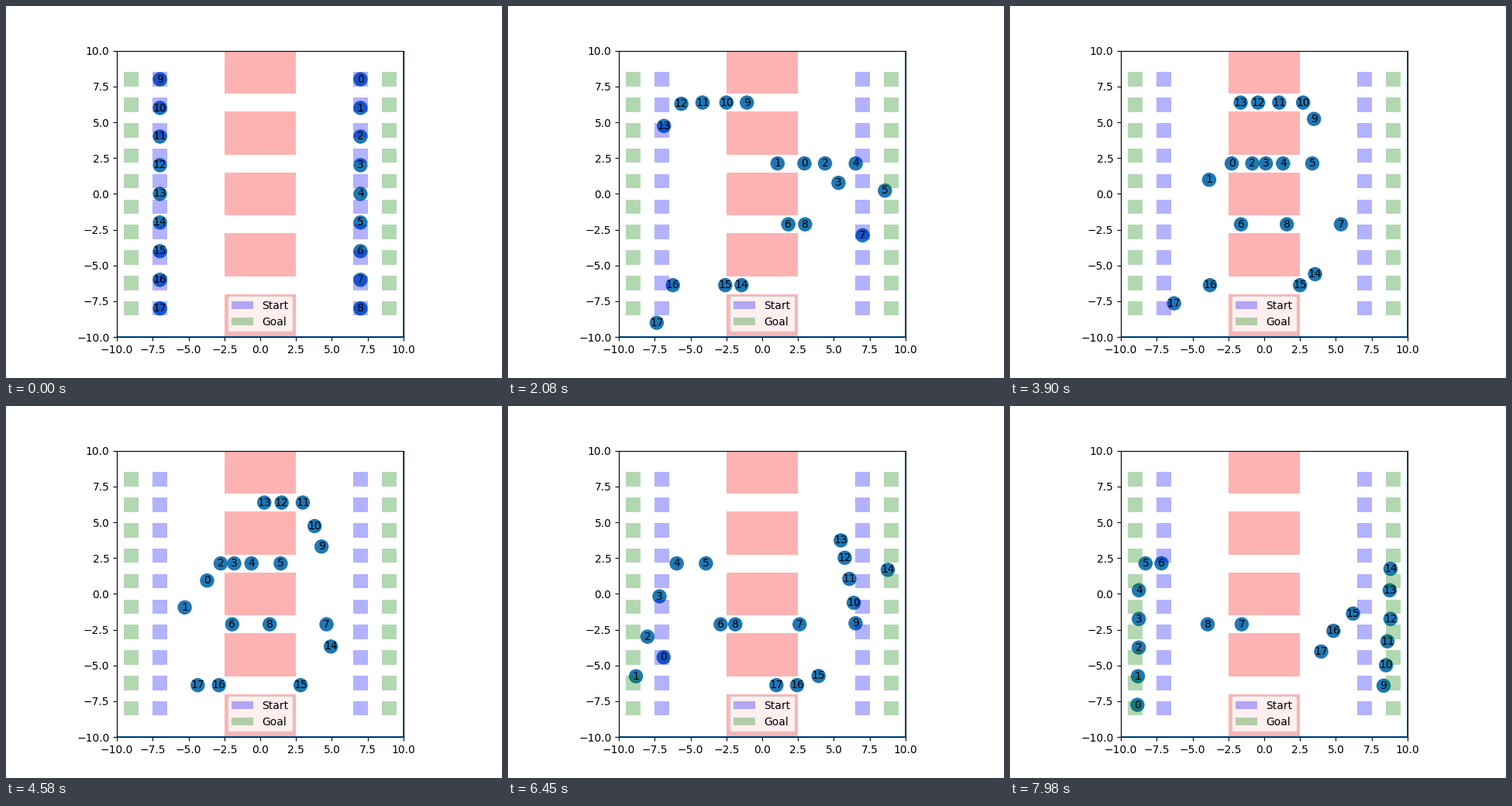
A matplotlib script that plays this animation: 640x480 px, repeating every 8 s.

```python
import numpy as np
import matplotlib.pyplot as plt
from matplotlib.animation import FuncAnimation
from matplotlib.patches import Circle, Rectangle

STEPS, STEP_MS = 320, 25
PACE = 14           # steps per unit, counted along the longer axis
GATE, GOAL = 3, 9   # |x| of the corridor mouths and of the goals
LANE = 2.125        # corridor centres lie at odd multiples of this
REACH = 0.25        # a robot halts this close to its goal

tracks = []


def robot(lane, *stops):
    """Pass timed stops (step, x[, y]), then run at full pace to the goal.

    Free running goes diagonally into the lane, straight through the
    corridor, and turns off towards the mirrored goal.
    """
    k = len(tracks)
    way = -1 if k < 9 else 1
    lane_y, y0 = lane * LANE, 8 - 2 * (k % 9)
    keys = [(0, -7 * way, y0)]
    for step, x, *y in stops:
        keys.append((step, x, y[0] if y else lane_y))

    t, x, y = keys[-1]
    enter = -way * max(GATE, abs(x) - abs(y - lane_y))
    leave = way * max(GATE, GOAL - abs(y0 + lane_y))
    route = [(enter, lane_y), (leave, lane_y), (GOAL * way, -y0)]
    for nx, ny in route:
        size = max(abs(nx - x), abs(ny - y))
        if way * nx > way * x and size > 0:
            t, x, y = t + PACE * size, nx, ny
            keys.append((t, x, y))

    t, x, y = np.array(keys, float).T
    q = np.minimum(np.arange(STEPS), t[-1] - PACE * REACH)
    tracks.append(np.column_stack([np.interp(q, t, x), np.interp(q, t, y)]))


# right side, heading left
robot(1)
robot(1)
robot(1, (52, 6.6))
robot(1, (68, 6.4, -0.3))
robot(1, (49, 8.96, 1.1))
robot(1, (77, 9, -0.2))
robot(-1, (47, 3.52), (156, -1.62), (258, -2.9))
robot(-1, (47, 7.67, -3.65), (120, 6.33), (262, 2.5))
robot(-1, (82, 3), (120, 2.8), (319, -3.95))

# left side, heading right
robot(3)
robot(3, (20, -7, 6))
robot(3, (47, -6.74))
robot(3, (51, -7.93, 4))
robot(3, (53, -9, 2.6))
robot(-3)
robot(-3, (20, -7, -4), (54, -4.6), (156, 2.5), (249, 3.6))
robot(-3, (47, -7.44), (184, -2.85))
robot(-3, (33, -7.1, -9), (137, -7.65, -9))

fig, ax = plt.subplots(figsize=(6.4, 4.8), dpi=100)
ax.set_aspect("equal")
ax.set_xlim(-10, 10)
ax.set_ylim(-10, 10)
ax.plot([-10, 10, 10, -10, -10], [-10, -10, 10, 10, -10], color="C0")

discs, tags = [], []
for k, track in enumerate(tracks):
    discs.append(ax.add_patch(Circle(track[0], 0.5, color="C0", lw=0)))
    tags.append(ax.text(*track[0], str(k), ha="center", va="center"))


def block(x, y, w, h, color, label=None):
    ax.add_patch(Rectangle((x, y), w, h, color=color, alpha=0.3, lw=0,
                           label=label))


for n in range(5):
    block(-2.5, 7 - 4.25 * n, 5, 3, "red")
for x, color, label in ((7, "blue", "Start"), (GOAL, "green", "Goal")):
    for side in (1, -1):
        for y in np.linspace(8, -8, 10):
            block(side * x - 0.5, y - 0.5, 1, 1, color, label)
            label = None
ax.legend(loc="lower center")


def update(step):
    for disc, tag, track in zip(discs, tags, tracks):
        disc.center = track[step]
        tag.set_position(track[step])
    return discs + tags


anim = FuncAnimation(fig, update, frames=STEPS, interval=STEP_MS,
                     repeat=True, repeat_delay=0)
plt.show()
```
